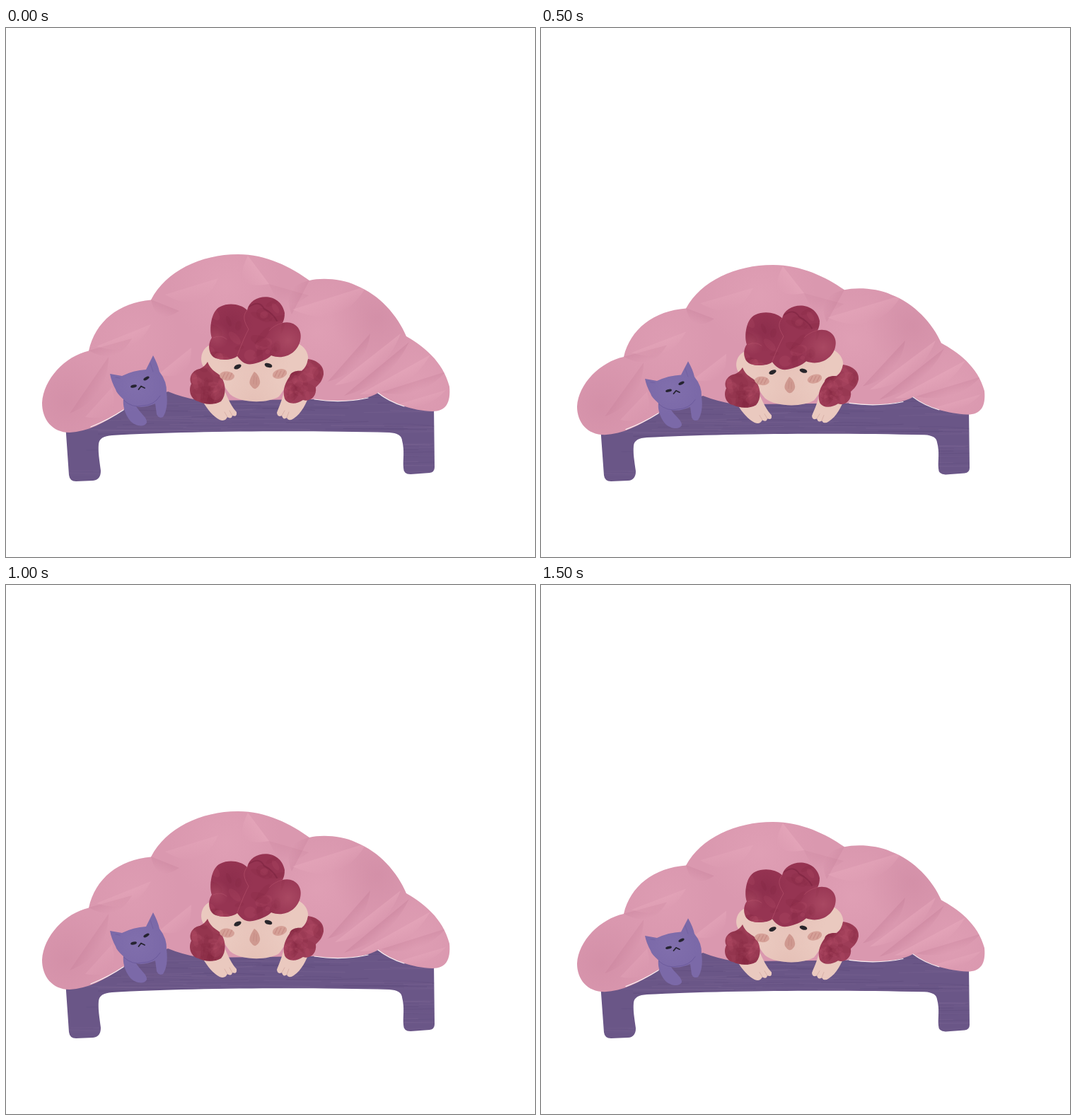
An HTML page with a canvas that plays this animation: 748x748 px, repeating every 2 s.

```html
<!DOCTYPE html>
<html lang="en">
<head>
<meta charset="utf-8">
<title>Under the blanket</title>
<style>
html, body { margin: 0; width: 100%; height: 100%; overflow: hidden; background: #fff; }
canvas { display: block; }
</style>
</head>
<body>
<canvas id="stage" width="748" height="748"></canvas>
<script>
const ctx = document.getElementById("stage").getContext("2d");
const STEP = 500, FLOOR = 640, SQUASH = 0.953;

const shapes = {
  bed: "M84 560 L165 520 L230 503 L526 505 L605 535 L606 621 Q606 628 599 629 L572 631 Q562 631 562 622 C561 610 564 598 560 583 Q559 573 542 572 C420 569 250 570 150 576 Q132 577 131 588 C130 600 132 610 134 626 Q134 639 123 640 L99 641 Q90 641 89 632 Z",
  blanket: "M51 530 C53 496 84 464 117 456.500 C126 415 160 388 205 384.500 C226 344 275 320 328 320 C368 320 403 338 429 357 C445 353 475 354 495 364 C528 377 554 407 566 436 C589 449 618 471 627 507 C629 530 622 542 603 542 C575 541 545 531 526 516 C510 526 475 531 436 525 L275 527 Q248 522 229 514 L166 540 C140 558 115 571 90 572 C65 572 51 553 51 530 Z",
  cat: "M147 489 L164 492 Q180 484 198 483 L208 463 Q215 476 217 486 Q228 500 227 516 C229 530 227 543 222 550 Q216 553 213 546 L211 531 Q195 538 184 535 C190 545 200 551 199 558 C195 566 182 562 176 556 C167 545 165 532 166 525 Q156 516 155 511 Q149 500 147 489 Z",
  face: "M289 448 C271 455 272 484 291 486 C301 492 308 507 317 518 C332 531 371 531 386 521 C395 510 400 495 410 487 C433 482 432 455 413 446 L350 430 Z",
  leftArm: "M277 526 L308 510 C314 525 320 537 326 543 Q327 551 320 548 Q319 554 313 550 Q310 557 302 554 C293 549 285 540 277 526 Z",
  rightArm: "M393 514 C390 528 385 538 383 544 Q384 551 390 548 Q392 555 397 551 Q400 557 407 552 C418 545 425 530 429 518 Z",
  leftCurl: "M285 472 C290 486 300 487 304 493 C311 503 312 519 304 528 C293 534 280 532 272 528 C262 526 257 513 262 503 C257 492 266 483 274 482 Q281 479 285 472 Z",
  rightCurl: "M427 468 C441 470 450 478 449 490 C447 500 443 503 438 508 C440 521 430 529 420 526 C410 533 398 532 394 524 C390 511 396 500 401 493 C402 486 412 484 418 485 Q425 480 427 468 Z",
  hair: "M341 399 C346 375 388 372 394 403 Q394 411 391 417 C408 413 420 426 416 442 C412 460 393 470 375 463 C369 469 358 473 349 475 C338 477 332 471 327 464 C320 470 305 470 297 467 C287 464 284 448 291 438 C287 425 290 400 303 394 C315 388 332 390 341 399 Z",
  mouth: "M351 486 C347 492 343 499 345 504 C347 507 350 511 353 510 C357 508 360 503 359 499 C358 493 355 488 351 486 Z"
};
const path = {};
for (const name in shapes) path[name] = new Path2D(shapes[name]);

function seeded(seed) {
  return () => (seed = (seed * 16807) % 2147483647) / 2147483647;
}

function fill(shape, color) {
  ctx.fillStyle = color;
  ctx.fill(shape);
}

function line(d, color, width) {
  ctx.strokeStyle = color;
  ctx.lineWidth = width;
  ctx.stroke(new Path2D(d));
}

function oval(x, y, rx, ry, angle, color) {
  ctx.fillStyle = color;
  ctx.beginPath();
  ctx.ellipse(x, y, rx, ry, angle, 0, Math.PI * 2);
  ctx.fill();
}

function inside(shape, paint) {
  ctx.save();
  ctx.clip(shape);
  paint();
  ctx.restore();
}

// A paper crease: sharp along one side, fading out across its width.
function fold(x1, y1, x2, y2, width, rgb, alpha) {
  const length = Math.hypot(x2 - x1, y2 - y1);
  const nx = -(y2 - y1) / length * width, ny = (x2 - x1) / length * width;
  const mx = (x1 + x2) / 2, my = (y1 + y2) / 2;
  const fade = ctx.createLinearGradient(mx, my, mx + nx, my + ny);
  fade.addColorStop(0, `rgba(${rgb},${alpha})`);
  fade.addColorStop(1, `rgba(${rgb},0)`);
  ctx.fillStyle = fade;
  ctx.beginPath();
  ctx.moveTo(x1, y1);
  ctx.lineTo(x2, y2);
  ctx.quadraticCurveTo(mx + nx * 2, my + ny * 2, x1, y1);
  ctx.fill();
}

function glow(x, y, r, rgb, alpha) {
  const soft = ctx.createRadialGradient(x, y, 0, x, y, r);
  soft.addColorStop(0, `rgba(${rgb},${alpha})`);
  soft.addColorStop(1, `rgba(${rgb},0)`);
  ctx.fillStyle = soft;
  ctx.fillRect(x - r, y - r, r * 2, r * 2);
}

function drawBed() {
  fill(path.bed, "#6a5687");
  inside(path.bed, () => {
    const rand = seeded(71);
    for (let i = 0; i < 130; i++) {
      const x = 70 + rand() * 500, y = 510 + rand() * 130, w = 40 + rand() * 140;
      const tone = rand() < 0.5 ? "rgba(70,53,102,.16)" : "rgba(142,121,163,.16)";
      line(`M${x} ${y} q${w / 2} ${rand() * 4 - 2} ${w} ${rand() * 4 - 2}`, tone, 0.6 + rand());
    }
  });
}

const LIGHT = "236,175,193", SHADE = "186,112,140";

function drawBlanket() {
  fill(path.blanket, "#da98af");
  inside(path.blanket, () => {
    glow(310, 365, 80, LIGHT, 0.3);
    glow(440, 430, 75, LIGHT, 0.3);
    glow(180, 435, 65, LIGHT, 0.2);
    glow(580, 500, 60, LIGHT, 0.25);
    glow(85, 530, 70, SHADE, 0.2);
    glow(525, 410, 65, SHADE, 0.2);
    fold(342, 322, 372, 362, 25, LIGHT, 0.45);
    fold(372, 362, 428, 378, 20, SHADE, 0.14);
    fold(429, 357, 404, 405, 16, SHADE, 0.2);
    fold(405, 398, 510, 365, 25, LIGHT, 0.35);
    fold(205, 384, 245, 400, 16, SHADE, 0.22);
    fold(225, 377, 300, 354, 22, LIGHT, 0.25);
    fold(117, 456, 178, 439, 16, SHADE, 0.22);
    fold(128, 450, 205, 419, 18, LIGHT, 0.3);
    fold(215, 490, 262, 452, 20, LIGHT, 0.35);
    fold(90, 545, 145, 465, 16, SHADE, 0.2);
    fold(112, 550, 150, 508, 22, LIGHT, 0.25);
    fold(455, 500, 515, 432, 15, SHADE, 0.28);
    fold(465, 505, 558, 432, 18, LIGHT, 0.4);
    fold(478, 520, 570, 444, 14, SHADE, 0.28);
    fold(500, 518, 600, 462, 17, LIGHT, 0.4);
    fold(530, 515, 622, 486, 14, SHADE, 0.22);
    fold(545, 535, 622, 512, 12, LIGHT, 0.3);
  });
  line("M120 564 Q145 554 166 540", "#f8edf1", 1.3);
  line("M436 525 Q475 531 512 523 M526 516 Q541 528 563 535", "#f8edf1", 1.2);
}

function drawCat() {
  fill(path.cat, "#7b69a8");
  inside(path.cat, () => {
    glow(184, 505, 38, "146,128,186", 0.25);
    line("M166 526 Q179 538 193 534 Q209 534 218 520", "rgba(88,72,140,.45)", 1);
    line("M161 495 L155 494 M204 474 L208 486", "rgba(90,72,140,.3)", 1);
  });
  oval(180.5, 506.5, 4.5, 2, -0.25, "#252330");
  oval(198.5, 495.5, 4.5, 2, -0.5, "#252330");
  line("M187.5 511 L191 506.5 L196 509", "#252330", 1.8);
}

function blotches(shape, seed, x, y, w, h) {
  inside(shape, () => {
    const rand = seeded(seed);
    for (let i = 0; i < 34; i++) {
      const tone = i % 3 ? "rgba(112,24,54,.12)" : "rgba(190,91,115,.16)";
      oval(x + rand() * w, y + rand() * h, 3 + rand() * 13, 2 + rand() * 7, rand() * 3, tone);
    }
  });
}

function drawCheek(x, y, angle) {
  oval(x, y, 10.5, 6.5, angle, "#d5a097");
  for (let i = -1; i < 2; i++) {
    line(`M${x + i * 5 - 2} ${y + 4} l4 -8`, "rgba(181,113,111,.45)", 1.1);
  }
}

function drawGirl() {
  const skin = "#eac9bf";
  fill(path.leftArm, skin);
  fill(path.rightArm, skin);
  line("M309 543 L313 550 M316 541 L320 548 M394 541 L390 548 M400 543 L397 551", "#d8b0a8", 1);
  fill(path.face, skin);
  inside(path.face, () => {
    glow(350, 530, 45, "213,163,154", 0.22);
    glow(350, 455, 55, "217,169,162", 0.25);
  });

  fill(path.leftCurl, "#983952");
  blotches(path.leftCurl, 23, 260, 475, 50, 55);
  fill(path.rightCurl, "#9d3c57");
  blotches(path.rightCurl, 37, 393, 470, 56, 60);
  fill(path.hair, "#963452");
  blotches(path.hair, 52, 288, 380, 105, 92);
  inside(path.hair, () => {
    glow(399, 442, 32, "188,92,114", 0.5);
    glow(298, 436, 18, "188,92,114", 0.4);
    glow(318, 418, 32, "104,22,54", 0.2);
    line("M341 399 C333 408 338 417 343 426 Q337 437 327 463", "rgba(190,91,115,.5)", 1);
    line("M391 417 Q379 420 372 428 M293 438 Q304 433 312 440", "rgba(190,91,115,.4)", 1);
    line("M344 394 Q358 384 365 397 Q378 404 383 414", "rgba(101,20,49,.3)", 2);
  });

  oval(327.5, 479, 5.5, 3, -0.45, "#28262b");
  oval(371, 477, 5.5, 3, 0.3, "#28262b");
  drawCheek(312.5, 492, 0.1);
  drawCheek(387, 489, -0.3);
  fill(path.mouth, "#cf9990");
  line("M351 492 L350 503 M354 494 L354 504", "rgba(175,111,108,.25)", 1.2);
}

function draw(pose) {
  ctx.setTransform(1, 0, 0, 1, 0, 0);
  ctx.fillStyle = "#fff";
  ctx.fillRect(0, 0, 748, 748);
  ctx.translate(0, FLOOR);
  ctx.scale(1, pose ? SQUASH : 1);
  ctx.translate(0, -FLOOR);
  ctx.lineCap = ctx.lineJoin = "round";
  drawBed();
  drawBlanket();
  drawCat();
  drawGirl();
}

const start = performance.now();
let shown = -1;
function tick() {
  const pose = Math.floor((performance.now() - start) / STEP) % 2;
  if (pose !== shown) draw(shown = pose);
  requestAnimationFrame(tick);
}
tick();
</script>
</body>
</html>
```
